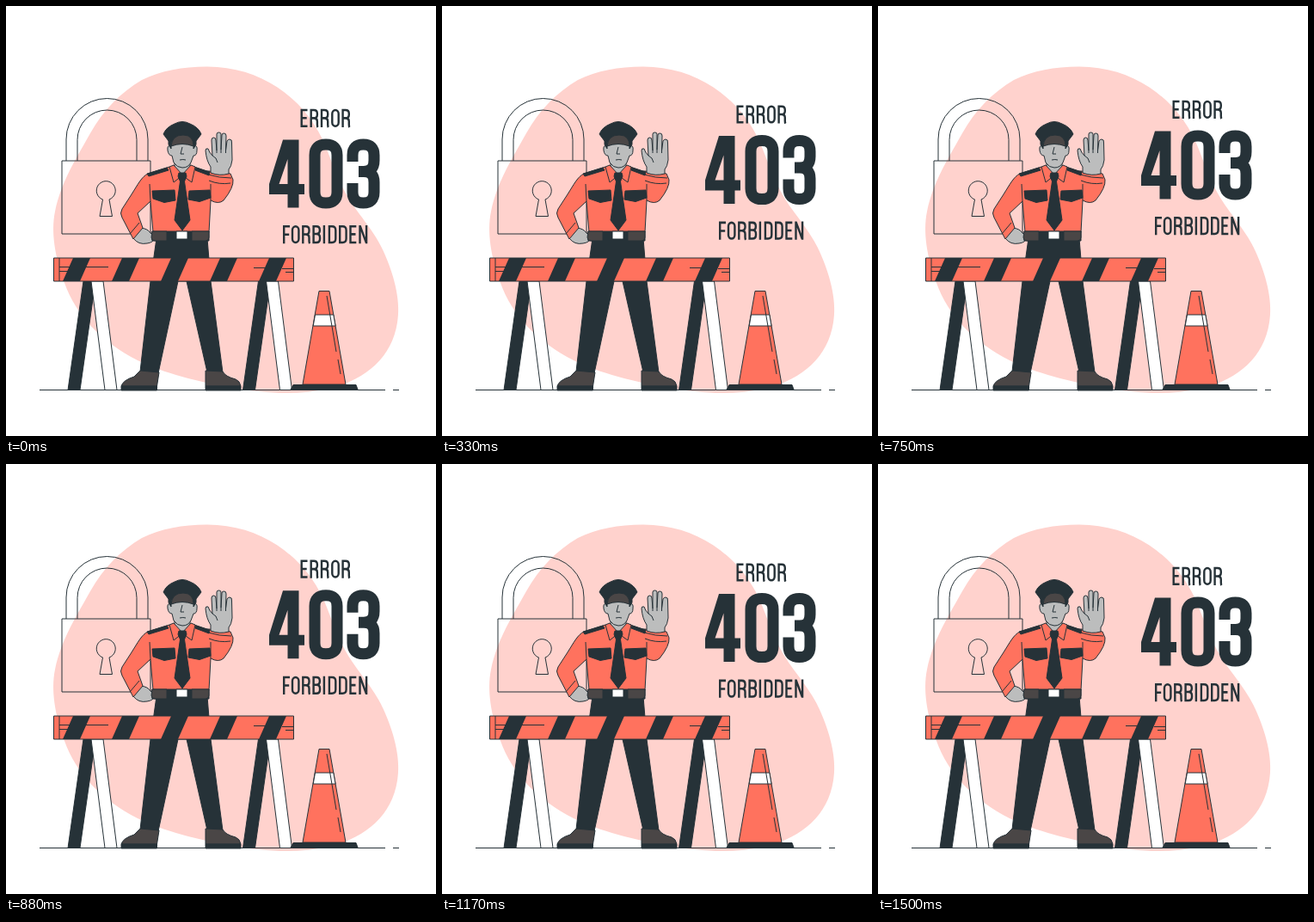
An HTML page for the animation above (1540 ms loop, 500 by 500 pixels).

```html
<!DOCTYPE html>
<html lang="en">
<head>
<meta charset="utf-8">
<title>Error 403 Forbidden</title>
<style>
  html, body { margin: 0; width: 100%; height: 100%; overflow: hidden; background: #fff; }
  svg { display: block; width: 100%; height: 100%; }
  .line { fill: none; }
  .ink { fill: #263238; }
  .coral { fill: #ff725e; }
  .skin { fill: #bcbdbd; }
  .gray { fill: #4a4646; }
  .white { fill: #fff; }
</style>
</head>
<body>
<svg viewBox="0 0 500 500" stroke="#263238" stroke-linejoin="round">
  <path id="blob" fill="#ffd2cd" stroke="none" d="M233 70.500C295 70 345 106 368 155C378 177 383 196 394 216C406 239 430 262 441 290C453 318 459 346 455 368C449 408 419 434 378 444C338 454 300 450 264 444C224 437 183 427 153 412C112 391 82 361 68 322C57 292 52 263 57 239C64 204 83 175 98 148C113 121 133 101 158 86C180 75 206 70.500 233 70.500Z"/>

  <g id="lock" class="line">
    <path d="M70 180V155a47.500 47.500 0 0 1 95 0V180M83 180V155.500a34.500 34.500 0 0 1 69 0V180"/>
    <path d="M65 180H168V265H65ZM112.500 225L109 244.500H123.500L120 225A11 11 0 1 0 112.500 225Z"/>
  </g>

  <path d="M39 446.500H441M450 446.500H457"/>

  <g id="guard">
    <path class="ink" d="M175 270H234L238 320L252 426H234L210 320H200L177 427L156 425L168 320Z"/>
    <path class="gray" d="M156 424L178 426L175.500 442H134Q136 435 149 431ZM232 424L252 425Q255 431 267 434Q272 436 273 442H232Z"/>
    <path class="ink" d="M134 442H175.500V447H134ZM232 442H273V447H232Z"/>

    <path class="skin" d="M149 262L157 258Q165 259 168 264L173 269Q172 275 164 276Q154 278 148 270Z"/>
    <path class="coral" d="M190 187L165 195C158 198 153 208 146 219L135 236Q132 241 135 246L148 271L159 258L153 241L168 227L171 263H236L238 226Q247 231 253 226Q265 211 264 202L261 195L236 192L233 192L219 187L205 199Z"/>
    <path class="line" d="M168 227L167 207M238 226V207M144 265L155 252M235 196Q248 200 262 200M236 203Q248 208 261 206"/>
    <path class="ink" d="M164 195L187 188L189 191L166 198ZM221 188L237 193L236 197L220 191ZM170 215L196 214L197 226L184 228.500L171 224ZM213 215L237 214L238 223L225 227.500L212 225Z"/>

    <path class="skin" d="M196 179V190L205 199L214 190V179Z"/>
    <path class="coral" d="M190 187L195 185L205 196L215 185L220 187L216 205L205 197L195 205Z"/>
    <path class="ink" d="M201 194H209L210 198L207.500 204L214 249L205 261L196 249L202.500 204L200 198Z"/>

    <path class="skin" d="M192 163Q187 161 188 168Q189 174 193 174L195 182Q199 188 205 188Q212 188 215 182L218 174Q222 174 222 168Q223 161 218 163V155H192Z"/>
    <path class="line" d="M205 164L203 172H207M202 179Q206 178 209 179"/>
    <path class="ink" d="M183 149Q186 141 196 137Q205 132 214 137Q224 141 227 149L221 157V161L218 166V158H192V166L189 161V157Z"/>
    <path class="gray" d="M192 163Q193 150 206 150Q218 150 218 163Q205 158 192 163Z"/>

    <path class="skin" d="M238 194V187Q233 180 232 168Q232 165 235 166Q236 170 240 174L239 156Q239 153 241.500 153Q244 153 244 156L245 168V149Q245 147 247.500 147Q250 147 250 149V167L251 150Q251 148 253.500 148Q256 148 256 151L255.500 168L257 157Q258 155 260 155Q263 155 262.500 159L263 179Q262 187 259 190V195Q248 198 238 194Z"/>
    <path class="line" d="M240 174Q245 176 246 182M245 168V171M250 167V171M255.500 168V171"/>

    <path class="ink" d="M170 262H236V273H170Z"/>
    <path class="gray" d="M170 262H187V273H173Q169 273 169 269ZM216 262H236V269Q236 273 232 273H216Z"/>
    <path class="white" d="M198 262H211V271H198Z"/>
  </g>

  <g id="barrier">
    <g id="legs">
      <path class="ink" d="M90 320H104L86 446.500H72Z"/>
      <path class="white" d="M99 320H113L129 446.500H115Z"/>
    </g>
    <use href="#legs" x="203.500"/>
    <path class="coral" d="M55.500 293H334.500V320H55.500Z"/>
    <path class="line" d="M62 293V320M62 303.500H119M62 308.500H82M288 304.500H302M321 305.500H334M325 309.500H334"/>
    <path id="stripes" class="ink" stroke="none"/>
  </g>

  <g id="cone">
    <path class="ink" d="M331 446L334 440.500H407L409 446Z"/>
    <path class="coral" d="M364 331.500H376L395 440H345Z"/>
    <path class="white" d="M359.500 359H380.800L383.100 372H357.200Z"/>
    <path class="line" d="M373 337L384 402M386 411L389 428"/>
  </g>

  <g id="sign" class="line" role="img" aria-label="ERROR 403 FORBIDDEN" stroke-linejoin="miter">
    <g id="words" stroke-width="2.400"></g>
    <path class="ink" fill-rule="evenodd" stroke="none" d="M322 155.500H340.500V207H347V219H340.500V234.500H327.500V219H306V207ZM327.500 178L317.500 207H327.500Z"/>
    <path stroke-width="13" d="M359 173.500Q359 161 372 161T385 173.500V216.500Q385 229 372 229T359 216.500ZM403 181V173.500Q403 161 415.500 161T428 173.500V179.500Q428 192.500 416 192.500H410M416 192.500Q428 192.500 428 205V216.500Q428 229 415.500 229T403 216.500V206"/>
  </g>
</svg>
<script>
const byId = id => document.getElementById(id);

byId('stripes').setAttribute('d',
  [0, 1, 2, 3, 4].map(i => `M${78 + 57 * i} 293h20l-12 27h-20z`).join(''));

// Condensed capitals: centreline and advance width
const glyphs = {
  E: ['M8 1.2H1.2V18.8H8M1.2 9.8H7.2', 11],
  F: ['M8 1.2H1.2V20M1.2 10.2H7.2', 9.8],
  O: ['M1.2 5.2a3.7 4 0 0 1 7.4 0v9.6a3.7 4 0 0 1-7.4 0z', 12.3],
  R: ['M1.2 20V1.2H4.5Q8.4 1.2 8.4 5V6.4Q8.4 10 4.5 10H1.2M4.5 10Q8.4 10 8.4 13.6V17Q8.4 19 9 20', 12.3],
  B: ['M1.2 9.4H4.6Q8.4 9.4 8.4 6V4.9Q8.4 1.2 4.6 1.2H1.2V18.8H4.6Q8.6 18.8 8.6 14.8V13.4Q8.6 9.4 4.6 9.4', 12.3],
  I: ['M1.2 0V20', 6],
  D: ['M1.2 1.2H4.4Q8.6 1.2 8.6 5.4V14.6Q8.6 18.8 4.4 18.8H1.2z', 12.3],
  N: ['M1.2 20V0M8.8 20V0M1.5 1L8.5 19', 12.3]
};

function lettering(word, x, y) {
  let out = '';
  for (const ch of word) {
    const [d, advance] = glyphs[ch];
    out += `<path transform="translate(${x} ${y}) scale(1 1.06)" d="${d}"/>`;
    x += advance;
  }
  return out;
}
byId('words').innerHTML = lettering('ERROR', 342.5, 119.8) + lettering('FORBIDDEN', 322, 255);

// The sign floats up 10px and back at constant speed, then rests briefly
const LOOP = 1540, FLOAT = 1500, LIFT = 10;
const sign = byId('sign');
const start = performance.now();

function draw(now) {
  const t = Math.min(Math.max(0, now - start) % LOOP, FLOAT);
  const lift = LIFT * (1 - Math.abs(2 * t / FLOAT - 1));
  sign.setAttribute('transform', `translate(0 ${-lift})`);
  requestAnimationFrame(draw);
}
draw(start);
</script>
</body>
</html>
```
